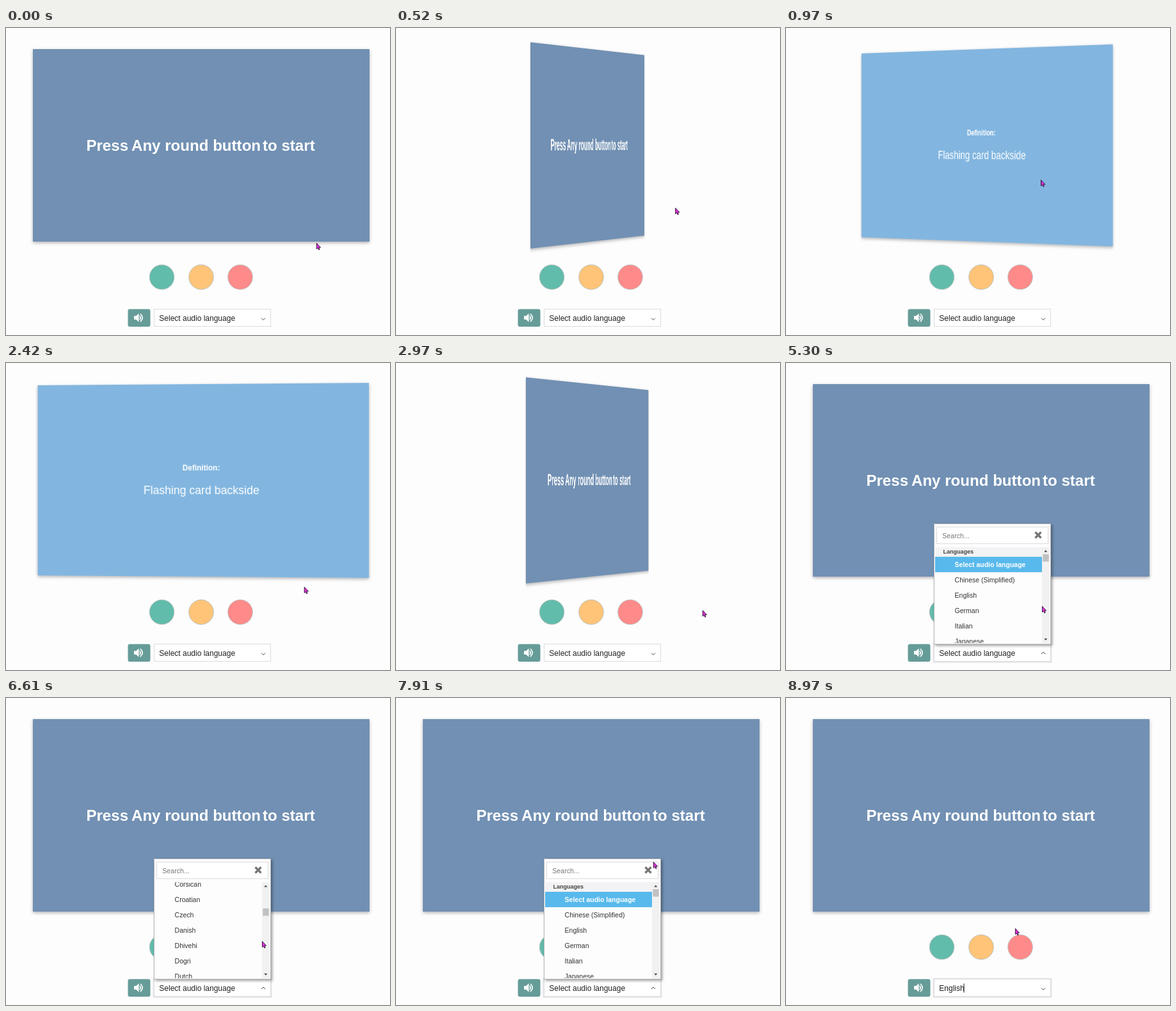
An HTML page for the animation above (9 s loop, 600 by 480 pixels).

```html
<!DOCTYPE html>
<html lang="en">
<head>
<meta charset="utf-8">
<title>Flash card</title>
<style>
html, body { margin: 0; width: 100%; height: 100%; overflow: hidden; background: #fdfdfe; }
body, text { font-family: "Liberation Sans", Arial, sans-serif; }
#stage { position: relative; width: 600px; height: 480px; overflow: hidden; }
#scene { position: absolute; left: 42px; top: 32.5px; width: 526px; height: 301px; perspective: 3700px; }
#card { position: absolute; inset: 0; transform-style: preserve-3d; }
.face { position: absolute; inset: 0; backface-visibility: hidden; box-shadow: 0 2px 5px rgba(0,0,0,.3); }
.face svg { position: absolute; left: 0; top: 0; }
.front { background: #7190b3; }
.back { background: #82b6e0; transform: rotateY(180deg); }
#ui { position: absolute; left: 0; top: 0; }
#panel .box { filter: drop-shadow(2px 2px 2px rgba(0,0,0,.4)); }
.bold { font-weight: bold; }
</style>
</head>
<body>
<div id="stage">
  <div id="scene"><div id="card">
    <div class="face front"><svg width="526" height="301" viewBox="42 32.5 526 301" fill="#fff" font-size="24.1" class="bold">
      <text x="125.4" y="191">Press</text>
      <text x="196" y="191">Any round button</text>
      <text x="401" y="191">to start</text>
    </svg></div>
    <div class="face back"><svg width="526" height="301" viewBox="42 32.5 526 301" fill="#fff" text-anchor="middle">
      <text x="305" y="167.6" font-size="12" class="bold">Definition:</text>
      <text x="305" y="204.5" font-size="18">Flashing card backside</text>
    </svg></div>
  </div></div>

  <svg id="ui" width="600" height="480">
    <defs><clipPath id="view"><rect x="232" y="288" width="168" height="150"/></clipPath></defs>

    <g stroke="#b9c0bd">
      <circle cx="243.5" cy="389.5" r="19.3" fill="#62bcab"/>
      <circle cx="305" cy="389.5" r="19.3" fill="#ffc478"/>
      <circle cx="366" cy="389.5" r="19.3" fill="#ff8a8a"/>
    </g>

    <rect x="190.5" y="439.5" width="35" height="27.5" rx="3" fill="#669c98"/>
    <path d="M200 450.3h3.2l4.3-4v13.4l-4.3-4H200z" fill="#fff"/>
    <path d="M209.2 450.4q2 2.6 0 5.2M210.4 447.3q5.6 5.7 0 11.4" fill="none" stroke="#fff" stroke-width="1.6" stroke-linecap="round"/>

    <rect id="glow" x="230.5" y="438.8" width="184" height="29" fill="none" stroke="#e6e6ea" stroke-width="2"/>
    <rect x="231.5" y="439.5" width="182" height="27" fill="#fff" stroke="#dcdce0"/>
    <text id="value" x="239.3" y="458" font-size="12" fill="#222"></text>
    <rect id="caret" x="277.5" y="446.5" width="1" height="14" fill="#111"/>
    <path id="chevron" fill="none" stroke="#444"/>

    <g id="panel">
      <rect class="box" x="231.5" y="251.5" width="182" height="188" fill="#fdfdfe" stroke="#b8b8bc"/>
      <rect x="235.5" y="256.5" width="174" height="26" fill="#fff" stroke="#dcdce0"/>
      <text x="244.3" y="273.6" font-size="10.6" fill="#777">Search...</text>
      <path d="M389.5 264.5l9 9m0-9l-9 9" stroke="#757575" stroke-width="3.2"/>
      <g clip-path="url(#view)"><g id="list"></g></g>
      <rect x="400" y="288" width="12" height="150" fill="#f1f1f2"/>
      <path d="M403.3 295.5h5l-2.5-3zM403.3 430.7h5l-2.5 3z" fill="#444"/>
      <rect id="thumb" x="401.3" width="9.4" height="11.5" fill="#c1c1c3"/>
    </g>

    <path id="cursor" d="M.4 .4V9.6L2.4 7.8 3.9 10.9 5.2 10.3 3.8 7.2H6.6Z" fill="#e32fdc" stroke="#2a1030" stroke-width=".9"/>
  </svg>
</div>

<script>
const LOOP = 9000, STEP = 30, FLIP = 2000;
const ROW = 24.1, HEAD = 15, VIEW = 288;
const OPEN = 4490, PICK = 8820;
const $ = id => document.getElementById(id);

const groups = {
  "Languages": "Select audio language,Chinese (Simplified),English,German,Italian,Japanese,Korean,Polish,Portuguese,Russian,Spanish,Turkish",
  "Other languages": "Afrikaans,Albanian,Amharic,Arabic,Armenian,Assamese,Aymara,Azerbaijani,Bambara,Basque,Belarusian,Bengali,Bhojpuri,Bosnian,Bulgarian,Catalan,Cebuano,Chichewa,Chinese (Simplified),Chinese (Traditional),Corsican,Croatian,Czech,Danish,Dhivehi,Dogri,Dutch,English"
};

function add(tag, attrs, text) {
  const el = document.createElementNS("http://www.w3.org/2000/svg", tag);
  for (const k in attrs) el.setAttribute(k, attrs[k]);
  if (text) el.textContent = text;
  $("list").append(el);
  return el;
}

const rows = [];
let y = VIEW;
for (const title in groups) {
  add("rect", { x: 233, y, width: 167, height: HEAD, fill: "#f3f3f5" });
  add("text", { x: 245.6, y: y + 9.8, "font-size": 9, fill: "#444", class: "bold" }, title);
  y += HEAD;
  for (const name of groups[title].split(",")) {
    const bg = add("rect", { x: 233, y, width: 167, height: ROW, fill: "none" });
    const label = add("text", { x: 263.6, y: y + 15.7, "font-size": 10.5 }, name);
    rows.push({ name, top: y, bg, label });
    y += ROW;
  }
}
rows[0].label.setAttribute("class", "bold");
const maxScroll = rows.find(r => r.name === "Corsican").top + ROW / 2 - 291;

// time, x, y
const path = [
  [0, 485, 336], [900, 399, 239], [970, 398, 237], [1500, 410, 255],
  [2254, 457, 334], [2420, 467, 352], [2800, 478, 383], [3200, 480, 391],
  [3610, 478, 389], [3700, 475, 392], [4400, 394, 454], [4820, 394, 454],
  [5120, 400, 380], [6600, 400, 380], [6850, 404, 335], [7000, 405, 333],
  [7200, 406, 302], [7480, 402, 256], [7890, 402, 256], [8730, 358, 360]
];
// time, share of the scroll
const wheel = [
  [5300, 0], [5450, .2], [5630, .2], [6060, .8], [6200, .8], [6330, 1],
  [7000, 1], [7200, 0]
];

function follow(keys, t) {
  const i = keys.findIndex(k => k[0] > t);
  if (i === 0) return keys[0].slice(1);
  if (i < 0) return keys[keys.length - 1].slice(1);
  const a = keys[i - 1], b = keys[i];
  const u = (t - a[0]) / (b[0] - a[0]);
  return a.slice(1).map((v, n) => v + (b[n + 1] - v) * u);
}

// CSS "ease": cubic-bezier(.25, .1, .25, 1)
function ease(x) {
  if (x <= 0) return 0;
  if (x >= 1) return 1;
  const bez = (s, a, b) => 3 * (1 - s) * s * ((1 - s) * a + s * b) + s * s * s;
  let lo = 0, hi = 1;
  for (let i = 0; i < 24; i++) {
    const mid = (lo + hi) / 2;
    if (bez(mid, .25, .25) < x) lo = mid; else hi = mid;
  }
  return bez(lo, .1, 1);
}

const show = (id, on) => $(id).style.display = on ? "" : "none";
let hot = 0;

function draw(t) {
  const angle = 180 * (ease((t - 26) / FLIP) - ease((t - 2254) / FLIP));
  $("card").style.transform = `rotateY(${angle}deg)`;

  const [cx, cy] = follow(path, t);
  $("cursor").setAttribute("transform", `translate(${cx} ${cy})`);

  const open = t >= OPEN && t < PICK, picked = t >= PICK;
  show("panel", open);
  show("glow", t >= OPEN);
  show("caret", picked);
  $("value").textContent = picked ? "English" : "Select audio language";
  $("chevron").setAttribute("d", open ? "M399 455l3-3 3 3" : "M399 453.5l3 3 3-3");

  const share = follow(wheel, t)[0];
  $("list").setAttribute("transform", `translate(0 ${-share * maxScroll})`);
  $("thumb").setAttribute("y", 299 + 30 * share);

  hot = 0;
  if (t > 7890 && cx < 400) {
    hot = Math.max(0, rows.findIndex(r => cy >= r.top && cy < r.top + ROW));
  }
  rows.forEach((r, i) => {
    r.bg.setAttribute("fill", i === hot ? "#58b9ec" : "none");
    r.label.setAttribute("fill", i === hot ? "#fff" : "#333");
  });
}

const start = performance.now();
function tick() {
  const t = (performance.now() - start) % LOOP;
  draw(Math.floor(t / STEP) * STEP);
  requestAnimationFrame(tick);
}
tick();
</script>
</body>
</html>
```
